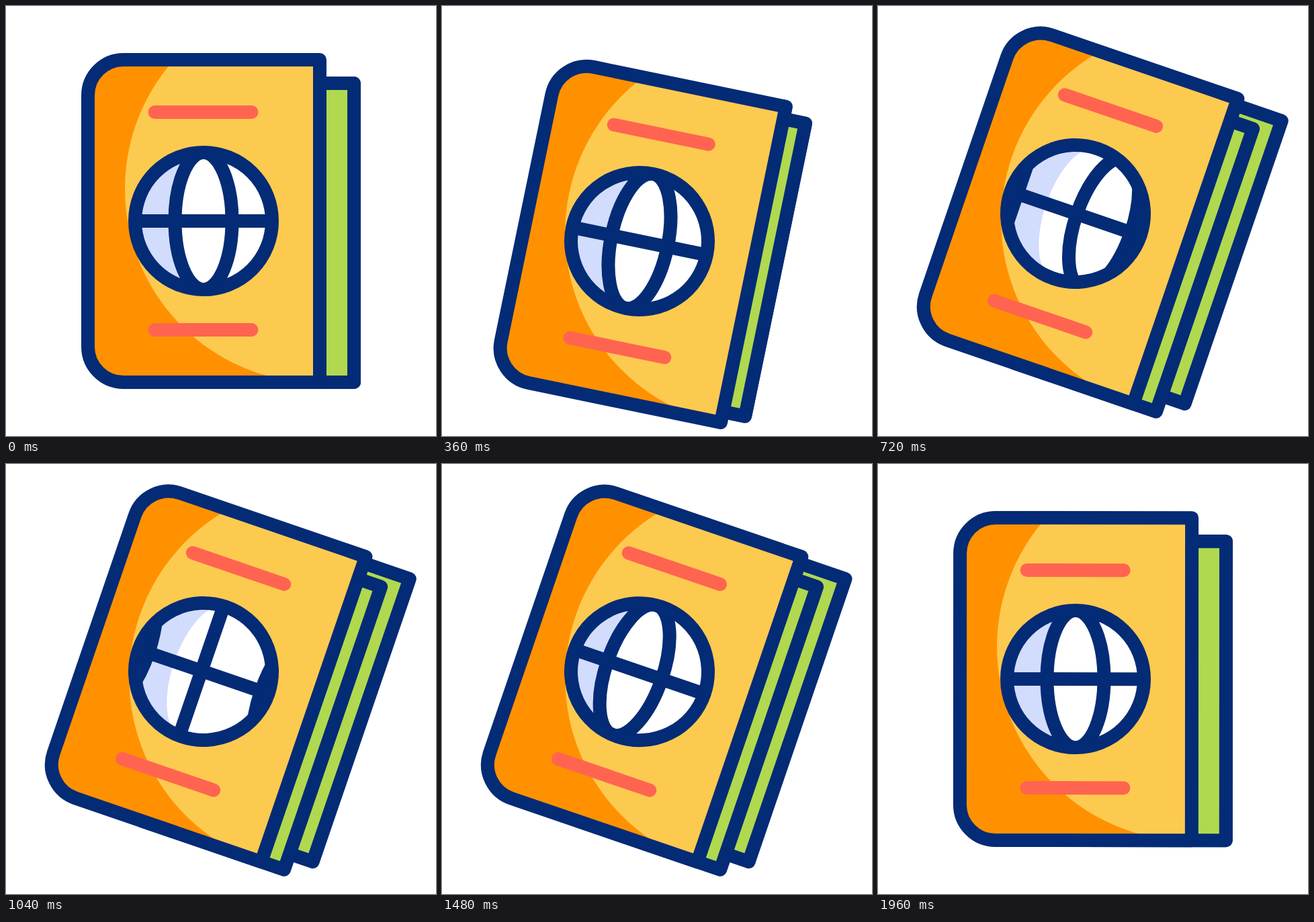
Write an HTML page that moves like this. It is 640x640 px and loops after 2 s.

```html
<!DOCTYPE html>
<html lang="en">
<head>
<meta charset="utf-8">
<title>Passport</title>
<style>
html, body { margin: 0; width: 100%; height: 100%; overflow: hidden; background: #fff; }
svg { display: block; width: 100vw; height: 100vh; }
.ink { stroke: #042b75; stroke-width: 20; stroke-linejoin: round; }
.bar { stroke: #ff6450; stroke-width: 20; stroke-linecap: round; }
</style>
</head>
<body>
<svg viewBox="0 0 640 640" fill="none">
  <defs>
    <path id="cover" d="M173-240H-119A53 53 0 0 0-172-187V187A53 53 0 0 0-119 240H173Z"/>
    <clipPath id="coverClip"><use href="#cover"/></clipPath>
    <clipPath id="globeClip"><circle r="102"/></clipPath>
  </defs>
  <!-- origin: centre of the globe -->
  <g id="book">
    <rect id="backPage" class="ink" x="0" y="-205" width="224" height="445" fill="#b0d950"/>
    <rect id="frontPage" class="ink" x="0" y="-205" width="224" height="445" fill="#b0d950"/>
    <g clip-path="url(#coverClip)">
      <rect x="-180" y="-250" width="360" height="500" fill="#ff9100"/>
      <circle cx="172" cy="-48" r="289" fill="#fdca50"/>
    </g>
    <use href="#cover" class="ink"/>
    <path class="bar" d="M-72.5-162H71.5M-72.5 162H71.5"/>
    <g clip-path="url(#globeClip)">
      <circle r="102" fill="#d2dcfd"/>
      <path d="M0-102A46 102 0 0 0 0 102H110V-102Z" fill="#fff"/>
      <g id="meridians" class="ink">
        <ellipse rx="42.5" ry="102"/>
        <path d="M-136-110V110"/>
        <ellipse cx="-262" rx="42.5" ry="102"/>
      </g>
    </g>
    <path class="ink" d="M-102 0H102"/>
    <circle class="ink" r="102"/>
  </g>
</svg>
<script>
const LOOP = 2000, SPIN_START = 560, SPIN_END = 1509, SPIN_WIDTH = 262;
const [book, backPage, frontPage, meridians] =
  ['book', 'backPage', 'frontPage', 'meridians'].map(id => document.getElementById(id));

// pose: centre y, angle, back page x/y, front page x/y
const rest = [320, 0, 0, 0, 0, 0];
const dip = [350, 11.65, -17.5, -16.5, -17.5, -16.5];
const lift = [309, 18.9, 21.5, -25, -15, 0];
const keys = [[0, rest], [20, rest], [358, dip], [575, lift],
  [1472, lift], [1682, dip], [1970, rest], [LOOP, rest]];

const progress = (t, from, to) => Math.min(1, Math.max(0, (t - from) / (to - from)));
const smooth = u => u * u * (3 - 2 * u);

function poseAt(t) {
  const i = keys.findIndex(([time]) => time > t);
  const [t0, a] = keys[i - 1], [t1, b] = keys[i];
  const u = smooth(progress(t, t0, t1));
  return a.map((v, k) => v + (b[k] - v) * u);
}

function move(el, x, y, extra = '') {
  el.setAttribute('transform', `translate(${x} ${y}) ${extra}`);
}

const start = performance.now();
function draw(now) {
  const t = Math.max(0, now - start) % LOOP;
  const [y, angle, backX, backY, frontX, frontY] = poseAt(t);
  move(book, 294, y, `rotate(${angle})`);
  move(backPage, backX, backY);
  move(frontPage, frontX, frontY);
  move(meridians, SPIN_WIDTH * progress(t, SPIN_START, SPIN_END), 0);
  requestAnimationFrame(draw);
}
draw(start);
</script>
</body>
</html>
```
